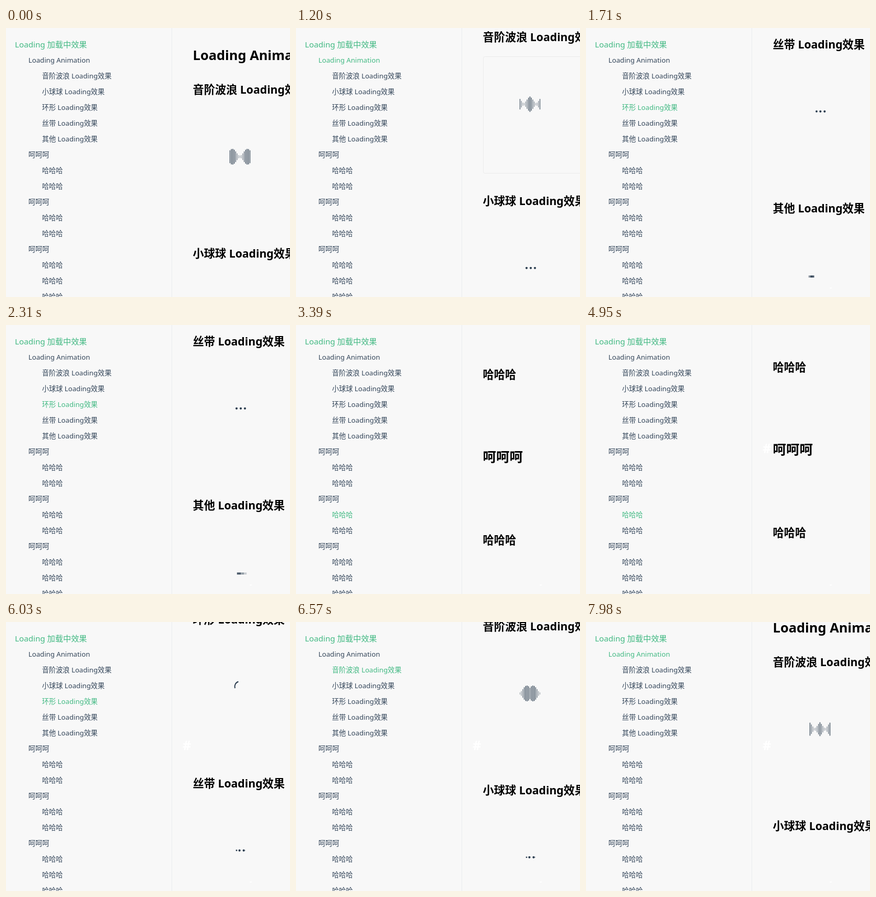
An HTML page for the animation above (8000 ms loop, 542 px wide and 512 px high).

```html
<!DOCTYPE html>
<html lang="zh-CN">
<head>
<meta charset="utf-8">
<style>
html, body { margin: 0; width: 100%; height: 100%; overflow: hidden; background: #f8f8f8; }
svg { display: block; width: 542px; height: 512px; font-family: "Noto Sans", "Noto Sans CJK SC", "Noto Sans CJK", sans-serif; }
text { white-space: pre; }
#nav text { font-size: 13.2px; fill: #34465a; }
#nav .root { font-size: 15.2px; }
#nav .on { fill: #42b983; }
#page text, #hash { font-weight: 700; font-size: 21.2px; fill: #000; }
#page .big, #hash { font-size: 25.4px; }
#hash { fill: #fff; }
.ink { fill: #2c3e50; }
</style>
</head>
<body>
<svg viewBox="0 0 542 512">
  <g id="page"></g>
  <text id="hash" x="337" y="244">#</text>
  <rect id="speck" x="465" y="494" width="4" height="2" fill="#fff"/>
  <path d="M316.5 0V512" stroke="#eaecef"/>
  <g id="nav"><text class="root on" x="17" y="37">Loading 加载中效果</text></g>
</svg>
<script>
const LOOP = 8000, CX = 446.5;
const $ = id => document.getElementById(id);
const page = $('page'), nav = $('nav');

function add(parent, tag, attrs, text = '') {
  const el = document.createElementNS('http://www.w3.org/2000/svg', tag);
  for (const k in attrs) el.setAttribute(k, attrs[k]);
  el.textContent = text;
  parent.appendChild(el);
  return el;
}
const set = (el, attrs) => { for (const k in attrs) el.setAttribute(k, attrs[k]); };

// [text, level, centre y on the page]
const heads = [
  ['Loading Animation', 1, 52],
  ['音阶波浪 Loading效果', 2, 118],
  ['小球球 Loading效果', 2, 430],
  ['环形 Loading效果', 2, 742],
  ['丝带 Loading效果', 2, 1054],
  ['其他 Loading效果', 2, 1366],
  ['呵呵呵', 1, 1680], ['哈哈哈', 2, 1840], ['哈哈哈', 2, 2007],
  ['呵呵呵', 1, 2163], ['哈哈哈', 2, 2323], ['哈哈哈', 2, 2490],
  ['呵呵呵', 1, 2646], ['哈哈哈', 2, 2805], ['哈哈哈', 2, 2972], ['哈哈哈', 2, 3139]
];
const links = heads.map(([text, level, y], i) => {
  add(page, 'text', { x: 356.6, y: y + (level < 2 ? 9 : 7), class: level < 2 ? 'big' : '' }, text);
  return add(nav, 'text', { x: 16.8 + 26 * level, y: 66 + 30 * i }, text);
});

const card = add(page, 'rect', { x: 357.5, y: 154.5, width: 600, height: 222, rx: 3, fill: 'none', stroke: '#ebebeb' });

// Sound wave: 15 bars, mirrored about the middle
const bars = Array.from({ length: 15 }, (_, i) =>
  add(page, 'rect', { x: CX - 0.7 + (i - 7) * 2.72, width: 1.4, class: 'ink' }));

function drawWave(t) {
  const peak = 5.3 + 10 * t / 855;
  bars.forEach((bar, i) => {
    const f = Math.abs(Math.cos(Math.PI * (Math.abs(i - 7) - peak) / 10)) ** 1.6;
    const h = 4 + 26 * f;
    set(bar, { y: 245 - h / 2, height: h, opacity: 0.35 + 0.65 * f });
  });
}

// Dots: one grows on the left, two slide right, one shrinks on the right
const dotRows = [556.8, 1180.8].map(y =>
  Array.from({ length: 4 }, () => add(page, 'circle', { cy: y, class: 'ink' })));

function drawDots(t) {
  const p = ((t - 1200) / 555 % 1 + 1) % 1;
  const xs = [440, 440 + 8 * p, 448 + 8 * p, 456];
  const rs = [p, 1, 1, 1 - p];
  for (const row of dotRows) row.forEach((dot, i) => set(dot, { cx: xs[i], r: 2.1 * rs[i] }));
}

const ring = add(page, 'path', { d: 'M0-10A10 10 0 0 1 10 0', fill: 'none', stroke: '#2c3e50', 'stroke-width': 2 });

// Sweeping blocks: the paler ones trail the dark one
const blocks = [0.22, 0.45, 0.8].map(o =>
  add(page, 'rect', { y: 1493, width: 7, height: 4, opacity: o, class: 'ink' }));

function drawBlocks(t) {
  blocks.forEach((b, i) => {
    const lag = 42 * (2 - i);
    set(b, { x: 444 + 20 * Math.cos(2 * Math.PI * (t - 2063 - lag) / 900) });
  });
}

// Scroll position at given times
const stops = [
  [0, 0], [930, 0], [1080, 100], [1350, 100], [1600, 1022], [2390, 1022],
  [2430, 1473], [2460, 1515], [2720, 1515], [2940, 2409], [3380, 2409],
  [3540, 1342], [4130, 1342], [4170, 1464], [4200, 1565], [4340, 1565],
  [4530, 2409], [5750, 2409], [6180, 109], [7890, 109], [7980, 41], [LOOP, 41]
];
function scrollAt(t) {
  const i = stops.findIndex(s => s[0] > t);
  const [t0, a] = stops[i - 1], [t1, b] = stops[i];
  const u = (t - t0) / (t1 - t0);
  return Math.round(a + (b - a) * u * u * (3 - 2 * u));
}

function draw(t) {
  const top = scrollAt(t);
  set(page, { transform: `translate(0 ${-top})` });
  const active = heads.filter(h => h[2] - 14 <= top).length - 1;
  links.forEach((el, i) => set(el, { class: i === active ? 'on' : '' }));
  set(card, { opacity: t > 930 && t < 1380 ? 1 : 0 });
  set($('hash'), { opacity: Math.min(1, Math.max(0, (t - 4860) / 90)) });
  set($('speck'), { opacity: t > 1600 ? 1 : 0 });
  set(ring, { transform: `translate(${CX} 869) rotate(${t * 0.4})` });
  drawWave(t);
  drawDots(t);
  drawBlocks(t);
}

const start = performance.now();
function tick() {
  draw((performance.now() - start) % LOOP);
  requestAnimationFrame(tick);
}
tick();
</script>
</body>
</html>
```
